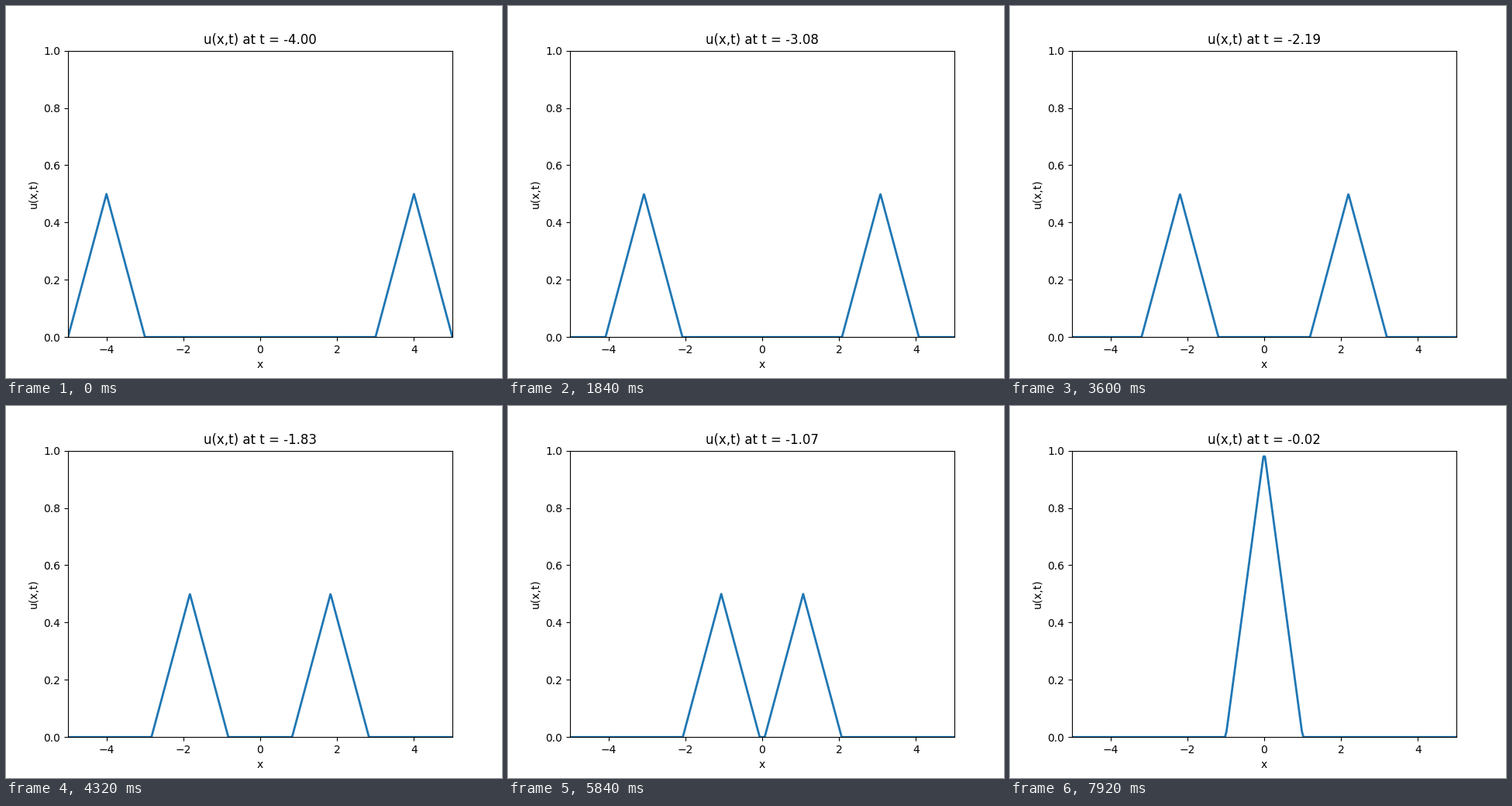
These frames come from a looping animation (640x480 px, 8 s). A matplotlib script:

```python
import matplotlib.pyplot as plt
import numpy as np
from matplotlib.animation import FuncAnimation

FRAMES = 100
INTERVAL = 80  # ms

x = np.linspace(-5, 5, 1000)
times = np.linspace(-4, 4, 2 * FRAMES)[:FRAMES]


def triangle(s):
    return np.maximum(1 - np.abs(s), 0)


def wave(t):
    """Two half-height pulses travelling in opposite directions."""
    return 0.5 * (triangle(x - t) + triangle(x + t))


fig, ax = plt.subplots(figsize=(6.4, 4.8), dpi=100)
line, = ax.plot(x, wave(times[0]), lw=2)
ax.set(xlim=(-5, 5), ylim=(0, 1), xlabel="x", ylabel="u(x,t)")
title = ax.set_title("")


def update(frame):
    t = times[frame]
    line.set_ydata(wave(t))
    title.set_text(f"u(x,t) at t = {t:.2f}")
    return line, title


anim = FuncAnimation(fig, update, frames=FRAMES, interval=INTERVAL,
                     repeat=True, repeat_delay=0)
plt.show()
```
